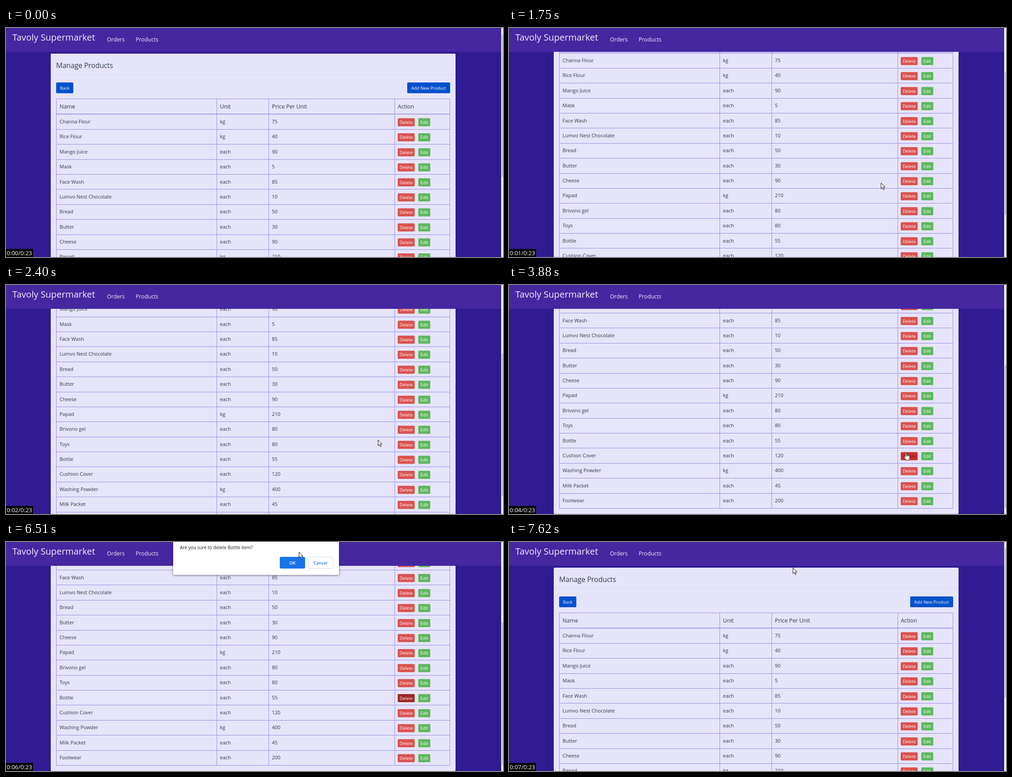
An HTML page with a canvas that plays this animation: 1100x509 px, repeating every 7990 ms.

```html
<!DOCTYPE html>
<html lang="en">
<head>
<meta charset="utf-8">
<title>Manage Products</title>
<style>
html, body { margin: 0; width: 100%; height: 100%; overflow: hidden; background: #311b92; }
canvas { display: block; width: 1100px; height: 509px; }
</style>
</head>
<body>
<canvas id="stage" width="1100" height="509"></canvas>
<script>
const ctx = document.getElementById('stage').getContext('2d');
const LOOP = 7990;
const ROW = 33.375;
const MAX_SCROLL = 263;
const INK = '#303a49';
const LINE = '#9c90e4';

const products = [
  ['Channa Flour', 'kg', 75], ['Rice Flour', 'kg', 40], ['Mango Juice', 'each', 90],
  ['Mask', 'each', 5], ['Face Wash', 'each', 85], ['Lumvo Nest Chocolate', 'each', 10],
  ['Bread', 'each', 50], ['Butter', 'each', 30], ['Cheese', 'each', 90],
  ['Papad', 'kg', 210], ['Brivono gel', 'each', 80], ['Toys', 'each', 80],
  ['Bottle', 'each', 55], ['Cushion Cover', 'each', 120], ['Washing Powder', 'kg', 400],
  ['Milk Packet', 'each', 45], ['Footwear', 'each', 200]
];
const BOTTLE = 12, CUSHION = 13;
const remaining = products.filter((p, i) => i !== BOTTLE);

// Timelines hold each value until the next time: [ms, ...values]
const scrollKeys = [[0, 0], [1240, 5], [1380, 40], [1500, 71], [1630, 104], [1750, 136],
  [1880, 143], [2150, 175], [2250, 214], [2400, 221.5], [2510, 250], [2630, MAX_SCROLL], [7480, 0]];
const clockKeys = [[0, 0], [990, 1], [2000, 2], [3000, 3], [3880, 4], [4880, 5], [5870, 6], [6890, 7]];
const cursorKeys = [[0, 'none', 0, 0], [130, 'arrow', 939, 494], [260, 'arrow', 935, 428],
  [490, 'arrow', 890, 392], [650, 'arrow', 823, 344], [890, 'arrow', 823, 334],
  [990, 'arrow', 823, 344], [3000, 'arrow', 830, 348], [3140, 'hand', 874, 389],
  [3620, 'hand', 874, 388], [3780, 'hand', 874, 380], [3880, 'hand', 874, 371],
  [4380, 'arrow', 877, 366], [4500, 'arrow', 877, 359], [4620, 'hand', 874, 351],
  [5870, 'arrow', 877, 352], [6020, 'arrow', 770, 170], [6140, 'arrow', 660, 5],
  [6430, 'arrow', 648, 22], [6530, 'arrow', 634, 42], [6620, 'arrow', 628, 47],
  [6890, 'arrow', 628, 57]];
const pressKeys = [[0, -1, ''], [3140, CUSHION, 'hover'], [4380, -1, ''],
  [4620, BOTTLE, 'hover'], [5430, BOTTLE, 'active'], [7250, -1, '']];
// opacity and downward slide of the dialog
const dialogKeys = [[0, 0, 0], [5620, 0.55, 0], [5740, 0.9, 4], [5870, 1, 5], [7030, 0.5, 2], [7130, 0, 0]];

function at(keys, t) {
  let found = keys[0];
  for (const key of keys) if (key[0] <= t) found = key;
  return found.slice(1);
}

function text(str, x, y, size, color, align = 'left', weight = 400) {
  ctx.font = `${weight} ${size}px "Open Sans", "Noto Sans", sans-serif`;
  ctx.textAlign = align;
  ctx.fillStyle = color;
  ctx.fillText(str, x, y);
}

function rect(x, y, w, h, color) {
  ctx.fillStyle = color;
  ctx.fillRect(x, y, w, h);
}

function box(x, y, w, h, r, fill, stroke) {
  ctx.beginPath();
  ctx.roundRect(x, y, w, h, r);
  if (fill) { ctx.fillStyle = fill; ctx.fill(); }
  if (stroke) { ctx.strokeStyle = stroke; ctx.lineWidth = 1; ctx.stroke(); }
}

function button(label, x, y, w, h, fill, color = '#fff') {
  box(x, y, w, h, 2, fill);
  text(label, x + w / 2, y + h / 2 + 3.6, 9.5, color, 'center');
}

function drawRow([name, unit, price], y, state) {
  text(name, 118.5, y + 20.5, 11, INK);
  text(unit, 473.5, y + 20.5, 11, INK);
  text(price, 588.5, y + 20.5, 11, INK);
  const fill = { hover: '#c9302c', active: '#a02622' }[state] || '#d9534f';
  button('Delete', 867, y + 9, 37.5, 18, fill, state === 'hover' ? '#741c2a' : '#fff');
  button('Edit', 912.5, y + 9, 26.5, 18, '#5cb85c');
  rect(111, Math.round(y + ROW) - 0.1, 872, 1.1, LINE);
}

function drawCard(items, pressed, state) {
  const bottom = 191.5 + ROW * items.length;
  ctx.shadowColor = 'rgba(20, 8, 90, .35)';
  ctx.shadowBlur = 3;
  box(99, 57, 896, bottom + 13 - 57, 2, '#e6e4fa');
  ctx.shadowBlur = 0;

  text('Manage Products', 111, 88.5, 15.5, INK);
  rect(99, 103, 896, 1, '#d9d6ee');
  button('Back', 111, 121, 38, 24, '#0052cc');
  button('Add New Product', 888, 121, 95, 24, '#0052cc');

  rect(111, 157, 872, 1, LINE);
  rect(111, 190.5, 872, 1.7, LINE);
  const heads = [['Name', 118.5], ['Unit', 473.5], ['Price Per Unit', 588.5], ['Action', 867]];
  for (const [label, x] of heads) text(label, x, 179, 12.3, INK);
  items.forEach((item, i) => drawRow(item, 191.5 + ROW * i, i === pressed ? state : ''));
  for (const x of [111, 466, 581, 860, 982]) rect(x, 157, 1, bottom - 157, LINE);
}

function drawNav() {
  rect(0, 0, 1100, 53, '#4527a0');
  text('Tavoly Supermarket', 14, 28, 19.9, '#f1eefb');
  text('Orders', 223.5, 29.5, 12.2, '#f1eefb');
  text('Products', 287, 29.5, 12.2, '#f1eefb');
}

function drawScrollbar(scroll, size) {
  rect(1096, 0, 4, 509, '#f1f1f1');
  rect(1097.4, 14 + scroll * 164 / MAX_SCROLL, 2.6, size, '#c1c1c1');
}

function drawDialog(alpha, slide) {
  if (!alpha) return;
  ctx.save();
  ctx.globalAlpha = alpha;
  ctx.translate(0, slide);
  ctx.shadowColor = 'rgba(0, 0, 0, .5)';
  ctx.shadowBlur = 5;
  ctx.shadowOffsetY = 1;
  box(370, -60, 367, 128, 2, '#fff');
  ctx.shadowColor = 'transparent';
  text('Are you sure to delete Bottle item?', 385, 11, 10.05, '#202124');
  box(606, 28, 56, 26, 3, '#1a73e8');
  text('OK', 634, 45, 9.5, '#fff', 'center', 600);
  box(668.5, 28.5, 55, 25, 3, null, '#dadce0');
  text('Cancel', 696, 45, 9.5, '#1a73e8', 'center', 600);
  ctx.restore();
}

const arrow = new Path2D('M.5 .5V13.2L3.4 10.5L5.5 15.4L7.7 14.4L5.6 9.7H9.3Z');
const hand = new Path2D('M3 11V2Q3 .6 4.2 .6T5.4 2V6.4Q7.6 5.6 7.9 7Q10 6.2 10.4 7.6' +
  'Q12.8 7 13 9.2V13Q12.8 15.6 11.6 18.4H4.8Q3.6 15.6 1.2 13Q-.2 10.4 1.2 10Q2 9.8 3 11Z');

function drawCursor(kind, x, y) {
  if (kind === 'none') return;
  const shape = kind === 'hand' ? hand : arrow;
  ctx.save();
  ctx.translate(x, y);
  ctx.fillStyle = '#fff';
  ctx.strokeStyle = '#111';
  ctx.lineWidth = 1;
  ctx.fill(shape);
  ctx.stroke(shape);
  if (kind === 'hand') {
    ctx.beginPath();
    for (const lineX of [5.4, 7.9, 10.4]) { ctx.moveTo(lineX, 7); ctx.lineTo(lineX, 10); }
    ctx.stroke();
  }
  ctx.restore();
}

function drawClock(seconds) {
  rect(0, 491, 60, 18, '#000');
  text(`0:0${seconds}/0:23`, 1.5, 505, 13, '#fff');
}

function draw(t) {
  const [scroll] = at(scrollKeys, t);
  const loading = t >= 7480 && t < 7620;
  const reloaded = t >= 7620;
  const items = loading ? [] : reloaded ? remaining : products;

  rect(0, 0, 1100, 509, '#311b92');
  ctx.save();
  // without a scrollbar the centred card sits further right
  ctx.translate(loading ? 6 : 0, -scroll);
  drawCard(items, ...at(pressKeys, t));
  ctx.restore();

  drawNav();
  if (!loading) drawScrollbar(scroll, reloaded ? 331 : 317);
  drawDialog(...at(dialogKeys, t));
  drawCursor(...at(cursorKeys, t));
  drawClock(at(clockKeys, t)[0]);
}

const start = performance.now();
function frame() {
  draw((performance.now() - start) % LOOP);
  requestAnimationFrame(frame);
}
frame();
</script>
</body>
</html>
```
